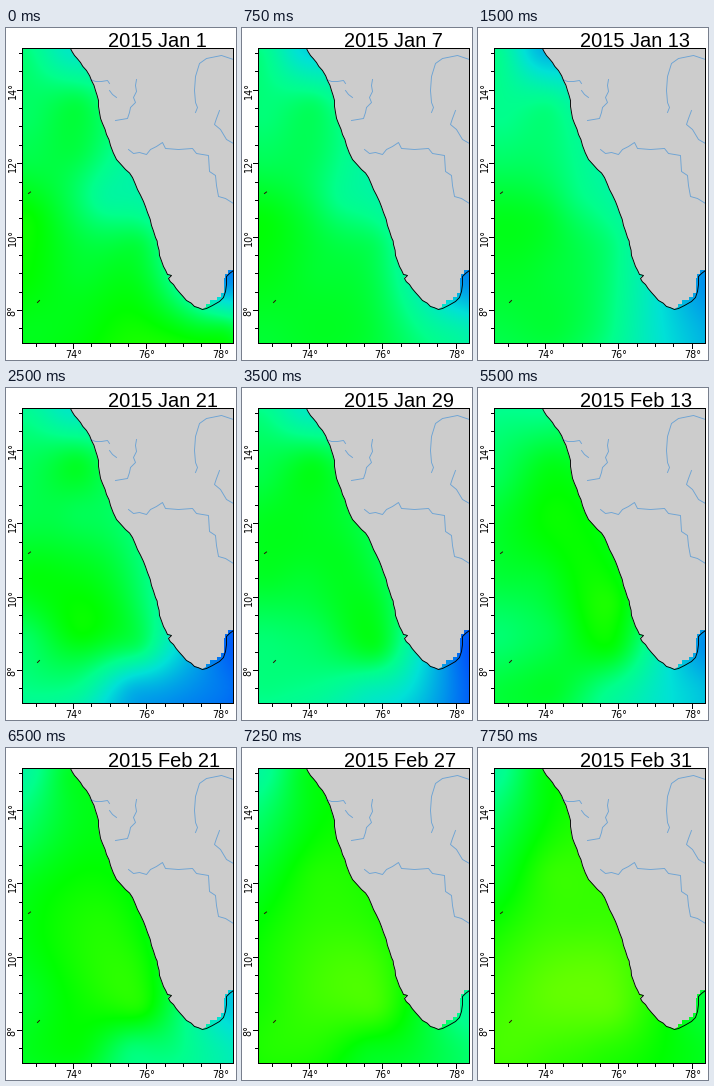
Recreate the animation shown at these times as a matplotlib script. Size 230 by 332 pixels, loop 8000 ms.

```python
import random

import matplotlib.pyplot as plt
import numpy as np
from matplotlib.animation import FuncAnimation
from matplotlib.patches import Polygon, Rectangle

W, H, DPI = 230, 332, 64
PT = 72 / DPI  # points per pixel
FRAMES, INTERVAL = 32, 250
LEFT, TOP, RIGHT, BOTTOM = 17, 21, 227, 315
DEGREE = 36.7

WEST_COAST = [
    (64, 20), (68, 27), (74, 34), (80, 42), (85, 52), (89, 62), (92, 72),
    (93, 84), (96, 95), (100, 106), (104, 117), (110, 131), (119, 141),
    (126, 149), (131, 161), (137, 173), (141, 184), (145, 197), (149, 209),
    (151, 216), (153, 227), (157, 238), (161, 246), (165, 247), (162, 250),
    (167, 256), (173, 264), (180, 272), (188, 278), (196, 281)]
EAST_COAST = [(200, 280), (206, 277), (213, 273), (217, 269), (219, 263),
              (220, 256), (220, 248), (223, 245), (227, 242)]
EAST_STEPS = [(200, 279), (200, 276), (204, 276), (204, 272), (211, 272),
              (211, 269), (215, 269), (215, 265), (218, 265), (218, 250),
              (219, 250), (219, 246), (222, 246), (222, 242), (227, 242)]
RIVERS = [
    [(84, 51), (89, 53), (95, 53), (101, 52), (103, 55)],
    [(103, 62), (106, 66), (110, 69)],
    [(109, 92), (121, 90), (123, 84), (124, 79), (129, 74), (127, 69),
     (130, 63), (129, 57), (130, 51)],
    [(122, 121), (127, 125), (133, 124), (140, 126), (144, 121), (150, 118),
     (156, 114), (159, 120), (172, 121), (186, 120), (190, 125), (202, 127),
     (203, 143), (209, 147), (210, 157), (212, 168), (219, 170), (227, 175)],
    [(227, 31), (215, 27), (200, 30), (193, 35), (189, 48), (188, 62),
     (189, 74), (191, 79), (189, 84)],
    [(213, 82), (210, 90), (208, 96), (214, 101), (220, 111), (227, 115)],
]
ISLANDS = [[(22, 165), (24, 163.5)], [(31, 274), (33, 272)]]

# Warmth at a few points of the sea, on some days of the loop
SPOTS = np.array([
    (62, 24), (22, 24), (22, 90), (72, 75), (22, 135), (72, 125), (100, 170),
    (22, 190), (65, 190), (22, 250), (75, 245), (135, 215), (135, 260),
    (22, 305), (75, 305), (125, 300), (170, 300), (222, 300), (222, 255)],
    dtype=float)
WARMTH = {
    0: [2.3, 3.1, 3.3, 3.5, 3.5, 3.5, 2.8, 4.05, 3.5, 4.0,
        3.7, 3.5, 3.8, 3.8, 3.9, 4.1, 3.9, 3.6, 1.0],
    6: [1.5, 2.9, 3.0, 3.0, 3.3, 3.2, 3.1, 3.8, 3.7, 3.7,
        3.6, 3.1, 3.1, 3.5, 3.6, 3.2, 2.3, 1.4, 1.0],
    10: [2.3, 2.9, 3.4, 3.7, 3.5, 3.4, 3.6, 3.9, 3.9, 3.3,
         4.0, 3.3, 3.2, 3.0, 2.8, 1.5, 1.1, 0.6, 0.4],
    17: [2.4, 3.1, 3.6, 3.8, 4.0, 4.05, 3.9, 3.6, 3.5, 3.1,
         2.9, 4.0, 4.1, 3.1, 3.0, 3.3, 2.6, 0.4, 0.3],
    22: [3.0, 3.0, 3.4, 3.8, 3.7, 4.05, 4.05, 3.6, 3.7, 3.2,
         3.5, 4.15, 3.9, 3.6, 3.7, 3.1, 2.4, 1.6, 1.0],
    26: [3.7, 2.8, 3.4, 3.8, 3.8, 4.0, 4.2, 3.9, 4.15, 3.7,
         4.1, 4.15, 4.15, 3.8, 3.9, 3.2, 3.1, 2.4, 1.7],
    31: [3.8, 2.9, 3.5, 4.05, 3.8, 4.35, 4.4, 4.2, 4.45, 4.45,
         4.7, 4.6, 4.65, 4.5, 4.4, 4.3, 4.1, 3.8, 3.6],
}
RAMP = np.array([(0, 64, 255), (0, 150, 235), (0, 225, 215),
                 (0, 255, 140), (0, 255, 0), (140, 255, 0)]) / 255


def kernel(points):
    gap = points[:, None, :] - SPOTS[None, :, :]
    return np.sqrt((gap ** 2).sum(axis=2) + 15 ** 2)


ys, xs = np.mgrid[TOP:BOTTOM, LEFT:RIGHT] + 0.5
BLEND = kernel(np.column_stack([xs.ravel(), ys.ravel()])) @ np.linalg.inv(
    kernel(SPOTS))
KEYS = list(WARMTH)
TABLE = np.array(list(WARMTH.values()))


def sea_colors(frame):
    spots = np.array([np.interp(frame, KEYS, col) for col in TABLE.T])
    mean = spots.mean()
    field = (mean + BLEND @ (spots - mean)).reshape(xs.shape)
    steps = np.arange(len(RAMP))
    return np.dstack([np.interp(field, steps, c) for c in RAMP.T])


def date_text(frame):
    month, step = divmod(frame, 16)
    return f"2015 {('Jan', 'Feb')[month]} {1 + 2 * step}"


def roughen(points, rng):
    """Add a slightly shifted midpoint to every segment."""
    out = [points[0]]
    for (x0, y0), (x1, y1) in zip(points, points[1:]):
        out.append(((x0 + x1) / 2 + rng.uniform(-0.8, 0.8),
                    (y0 + y1) / 2 + rng.uniform(-0.5, 0.5)))
        out.append((x1, y1))
    return out


def stroke(points, color, width=1.0, z=4):
    px, py = np.array(points, dtype=float).T + 0.5
    ax.plot(px, py, color=color, lw=width * PT, zorder=z)


def bar(x, y, w, h):
    ax.add_patch(Rectangle((x, y), w, h, fc="black", lw=0,
                           antialiased=False, zorder=6))


def draw_scale():
    font = dict(family="DejaVu Sans", size=9.6 * PT, ha="center", va="center")
    for half in range(146, 157):
        x = round(67 + (half / 2 - 74) * DEGREE)
        major = half % 4 == 0
        bar(x, BOTTOM + 1, 1, 5 if major else 3)
        if major:
            ax.text(x + 0.5, 326.5, f"{half // 2}°", **font)
    for half in range(15, 31):
        y = round(282 - (half / 2 - 8) * DEGREE)
        major = half % 4 == 0
        size = 5 if major else 3
        bar(LEFT - 1 - size, y, size, 1)
        if major:
            ax.text(6.5, y + 0.5, f"{half // 2}°", rotation=90, **font)


fig = plt.figure(figsize=(W / DPI, H / DPI), dpi=DPI, facecolor="white")
ax = fig.add_axes([0, 0, 1, 1])
ax.axis("off")

sea = ax.imshow(sea_colors(0), extent=(LEFT, RIGHT, BOTTOM, TOP),
                interpolation="nearest", aspect="auto", zorder=1)
ax.set(xlim=(0, W), ylim=(H, 0))

coast = roughen(WEST_COAST, random.Random(4))
ax.add_patch(Polygon(coast + EAST_STEPS + [(RIGHT, TOP - 1)],
                     fc="#cccccc", lw=0, zorder=2))
for river in RIVERS:
    stroke(river, "#6ca3d4", 0.9, 3)
stroke(coast + EAST_COAST, "black", 0.9)
for island in ISLANDS:
    stroke(island, "#301008")

bar(LEFT - 1, TOP - 1, RIGHT - LEFT + 2, 1)
bar(LEFT - 1, BOTTOM, RIGHT - LEFT + 2, 1)
bar(LEFT - 1, TOP - 1, 1, BOTTOM - TOP + 2)
bar(RIGHT, TOP - 1, 1, BOTTOM - TOP + 2)
draw_scale()
title = ax.text(101.5, 19, date_text(0), family="Liberation Sans",
                size=20 * PT, va="baseline", zorder=7)


def update(frame):
    sea.set_data(sea_colors(frame))
    title.set_text(date_text(frame))
    return sea, title


anim = FuncAnimation(fig, update, frames=FRAMES, interval=INTERVAL,
                     repeat=True, repeat_delay=0)
plt.show()
```
